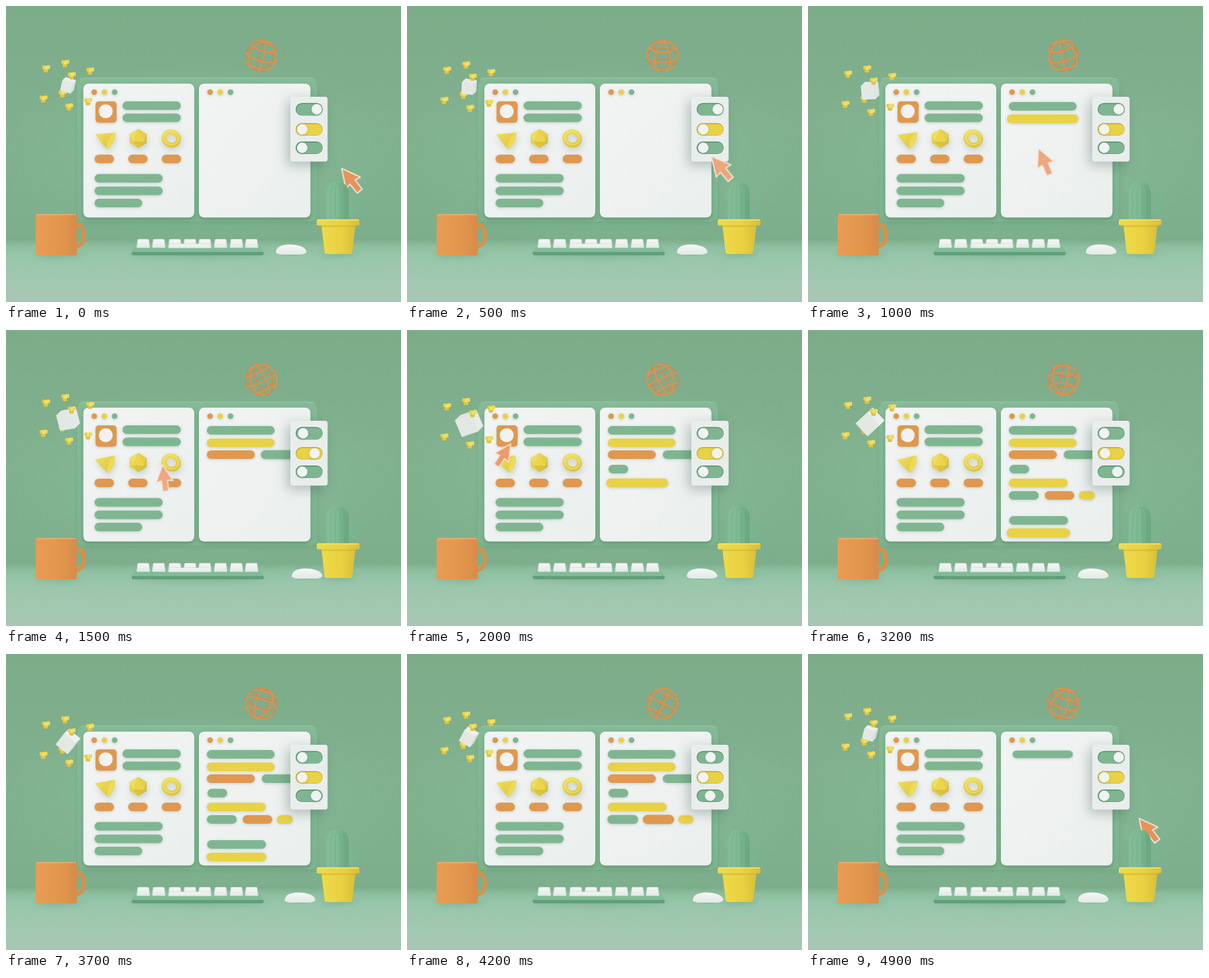
Write an HTML page that moves like this. It is 600 px wide and 450 px high and loops after 5 s.

```html
<!DOCTYPE html>
<html lang="en">
<head>
<meta charset="utf-8">
<title>Desk scene</title>
<style>
  html, body { margin: 0; width: 100%; height: 100%; overflow: hidden; background: #7fae8c; }
  svg { display: block; width: 100vw; height: 100vh; }

  .green { fill: #7fb691; }
  .yellow { fill: #e9d246; }
  .orange { fill: #e0984f; }
  .white { fill: #f0f3f2; }
  .soft { filter: drop-shadow(0 1.5px 2px rgba(50, 90, 65, .24)); }
  .float { filter: drop-shadow(1px 4px 5px rgba(60, 90, 75, .22)); }
  .lift { filter: drop-shadow(0 3px 3px rgba(40, 85, 58, .3)); }
  .raised { filter: drop-shadow(-5px 6px 9px rgba(50, 85, 68, .32)); }

  #knob1, #knob2, #knob3, #mouse, #cursor, #cone { animation: 5s linear infinite; }
  #knob1 { animation-name: knob1; }
  #knob2 { animation-name: knob2; }
  #knob3 { animation-name: knob3; }
  #mouse { animation-name: mouse; }
  #cursor { animation-name: cursor; }
  #cone { animation-name: cone; transform-origin: 152px 203px; }

  @keyframes knob1 {
    0%, 20% { transform: translateX(22px); animation-timing-function: ease-in-out; }
    32%, 78% { transform: none; animation-timing-function: ease-in-out; }
    90%, 100% { transform: translateX(22px); }
  }
  @keyframes knob2 {
    0%, 20% { transform: none; animation-timing-function: ease-in-out; }
    33%, 54% { transform: translateX(21px); animation-timing-function: ease-in-out; }
    66%, 100% { transform: none; }
  }
  @keyframes knob3 {
    0%, 54% { transform: none; animation-timing-function: ease-in-out; }
    66%, 78% { transform: translateX(21px); animation-timing-function: ease-in-out; }
    90%, 100% { transform: none; }
  }
  @keyframes mouse {
    0%, 12% { transform: none; animation-timing-function: ease-in-out; }
    28%, 34% { transform: translateX(24px); animation-timing-function: ease-in-out; }
    48%, 65% { transform: none; animation-timing-function: ease-in-out; }
    82%, 85% { transform: translateX(24px); animation-timing-function: ease-in-out; }
    97%, 100% { transform: none; }
  }
  @keyframes cursor {
    0% { transform: translate(510px, 247px) rotate(-38.5deg) scale(1); fill: #e6935a; visibility: visible; }
    10% { transform: translate(462.5px, 228.5px) rotate(-40deg) scale(1.04); fill: #eba679; }
    30% { transform: translate(238px, 205px) rotate(-7deg) scale(.92); fill: #f1a780; }
    50% { transform: translate(77.5px, 141px) rotate(73deg) scale(.88); fill: #e98f55; animation-timing-function: ease-in; }
    61% { transform: translate(101px, 342px) rotate(73deg) scale(.85); fill: #e98f55; visibility: visible; }
    61.1%, 87.9% { transform: translate(496px, 328px) rotate(-30deg) scale(.9); visibility: hidden; }
    88% { transform: translate(496px, 328px) rotate(-30deg) scale(.9); fill: #e98f55; visibility: visible; animation-timing-function: ease-out; }
    98% { transform: translate(503px, 250px) rotate(-38.5deg) scale(1); fill: #e6935a; }
    100% { transform: translate(510px, 247px) rotate(-38.5deg) scale(1); fill: #e6935a; visibility: visible; }
  }
  @keyframes cone {
    0%, 100% { transform: none; animation-timing-function: ease-in-out; }
    50% { transform: rotate(-10deg); animation-timing-function: ease-in-out; }
  }
</style>
</head>
<body>
<svg viewBox="0 0 600 450" preserveAspectRatio="none">
  <defs>
    <linearGradient id="room" x2="0" y2="1">
      <stop offset="0" stop-color="#7dac89"/>
      <stop offset=".4" stop-color="#80b08e"/>
      <stop offset=".7" stop-color="#7eb08e"/>
      <stop offset=".79" stop-color="#7dae8c"/>
      <stop offset=".812" stop-color="#8dbf9f"/>
      <stop offset=".85" stop-color="#99c6ab"/>
      <stop offset=".92" stop-color="#a2c8b0"/>
      <stop offset="1" stop-color="#a8c6b5"/>
    </linearGradient>
    <radialGradient id="glow">
      <stop offset="0" stop-color="#8fc4a2" stop-opacity=".5"/>
      <stop offset="1" stop-color="#8fc4a2" stop-opacity="0"/>
    </radialGradient>
    <linearGradient id="frame" x2="0" y2="1">
      <stop offset="0" stop-color="#86ba97"/>
      <stop offset="1" stop-color="#7eb48f"/>
    </linearGradient>
    <linearGradient id="paper" x2="1" y2="1">
      <stop offset="0" stop-color="#f1f4f3"/>
      <stop offset="1" stop-color="#ebefee"/>
    </linearGradient>
    <linearGradient id="clay">
      <stop offset="0" stop-color="#e79c53"/>
      <stop offset=".5" stop-color="#e3984f"/>
      <stop offset="1" stop-color="#d98b48"/>
    </linearGradient>
    <linearGradient id="pot">
      <stop offset="0" stop-color="#efda48"/>
      <stop offset=".6" stop-color="#e9d142"/>
      <stop offset="1" stop-color="#d9bf38"/>
    </linearGradient>
    <linearGradient id="plant">
      <stop offset="0" stop-color="#83bd97"/>
      <stop offset=".45" stop-color="#80bb95"/>
      <stop offset="1" stop-color="#68a680"/>
    </linearGradient>
    <linearGradient id="lemon" x2="1" y2="1">
      <stop offset="0" stop-color="#f0df5c"/>
      <stop offset="1" stop-color="#dcc13a"/>
    </linearGradient>
    <linearGradient id="cap" x2="0" y2="1">
      <stop offset="0" stop-color="#f5f7f6"/>
      <stop offset="1" stop-color="#e2e9e5"/>
    </linearGradient>
    <filter id="blur" x="-50%" y="-200%" width="200%" height="500%"><feGaussianBlur stdDeviation="4"/></filter>
    <g id="puff">
      <rect x="-6" y="-4.5" width="6.5" height="5.5" rx="1.6" fill="#e6cf4c"/>
      <rect x="0" y="-5" width="6" height="6" rx="1.6" fill="#eedb58"/>
      <rect x="-4" y="-1" width="7" height="7" rx="1.8" fill="#dfc43f"/>
      <rect x="-2.5" y="-3.5" width="5" height="5.5" rx="1.6" fill="#f0e06a"/>
    </g>
  </defs>

  <rect width="600" height="450" fill="url(#room)"/>
  <ellipse cx="300" cy="225" rx="330" ry="140" fill="url(#glow)"/>
  <g filter="url(#blur)" fill="#4f8a68">
    <rect x="112" y="120" width="362" height="212" rx="12" opacity=".2"/>
    <ellipse cx="80" cy="379" rx="36" ry="3" opacity=".35"/>
    <ellipse cx="292" cy="379" rx="102" ry="3" opacity=".35"/>
    <ellipse cx="505" cy="377" rx="26" ry="3" opacity=".35"/>
  </g>

  <!-- monitor -->
  <rect x="107" y="108.5" width="366.5" height="220.5" rx="12" fill="url(#frame)"/>
  <rect x="107.5" y="109" width="365.5" height="219.5" rx="11.5" fill="none" stroke="#6ca27e" stroke-opacity=".5"/>
  <path d="M112 112Q115 109.3 120 109.3H461Q466 109.3 469 112" fill="none" stroke="#93c4a3" stroke-width="1.2"/>
  <g class="lift" fill="url(#paper)">
    <rect x="117.5" y="118" width="168.5" height="203.5" rx="8"/>
    <rect x="293" y="118" width="169.5" height="203.5" rx="8"/>
  </g>
  <g id="page" class="soft">
    <rect class="orange" x="136" y="145" width="32" height="32.5" rx="5"/>
    <circle class="white" cx="151.5" cy="160" r="10.6"/>
  </g>

  <g class="float">
    <g id="cone">
      <path d="M136 195L166 192.500Q168 205 153.500 217.500Q144 208 136 195Z" fill="url(#lemon)"/>
      <ellipse cx="159.5" cy="205" rx="13.6" ry="4" transform="rotate(117 159.5 205)" fill="#eddb58"/>
    </g>
    <path d="M201 187L213.5 194.5V208.5L201 216L188 208.5V194.5Z" fill="#e6d04c"/>
    <path d="M201 187L188 194.5L192 206Z" fill="#efdd62"/>
    <path d="M201 187L213.5 194.5L210 206Z" fill="#e5ce4a"/>
    <path d="M201 187L192 206H210Z" fill="#ebd54c"/>
    <path d="M192 206H210L201 216Z" fill="#dcc340"/>
    <path d="M210 206L213.5 194.5V208.5L201 216Z" fill="#d7bc3b"/>
    <g transform="rotate(20 251 201.5)" fill="none">
      <ellipse cx="251" cy="201.5" rx="11.2" ry="10" stroke="url(#lemon)" stroke-width="7.6"/>
      <ellipse cx="250.6" cy="200.8" rx="11.2" ry="10" stroke="#f4e882" stroke-opacity=".5" stroke-width="2.4"/>
    </g>
  </g>

  <g id="code" class="soft"></g>

  <!-- switch panel -->
  <rect class="raised" x="432" y="138" width="56.5" height="98.5" rx="4" fill="#e9eeec"/>
  <g id="switches"></g>

  <g id="globe" fill="none" stroke-linecap="round">
    <path id="back" stroke="#cf8750" stroke-width="1.6"/>
    <path id="front" stroke="#e1914f" stroke-width="2.1"/>
  </g>

  <g id="cursor" stroke="#efe6dc" stroke-width="1.8" stroke-linejoin="round">
    <path d="M0 0L14 28L5 26.5L4.8 44H-4.8L-5 26.5L-14 28Z"/>
  </g>

  <g id="floaters">
    <g id="puffs"></g>
    <g id="cube" stroke-linejoin="round" stroke-width=".8"></g>
    <use href="#puff" x="100" y="105.5"/>
  </g>

  <!-- mug -->
  <path d="M104 332.500H107Q118.500 333 118.500 349T104 366" fill="none" stroke="#dc8f49" stroke-width="5.5"/>
  <rect x="45" y="316.5" width="62.5" height="62.5" rx="3.5" fill="url(#clay)"/>
  <rect x="46" y="316.5" width="60.5" height="1.6" rx=".8" fill="#edb074"/>

  <!-- keyboard -->
  <path d="M196 365.500H387L391.5 374H191Z" fill="#82bb97"/>
  <path d="M191 374H391.5V377Q391.5 379 389 379H193.5Q191 379 191 377Z" fill="#5f9f79"/>
  <g id="keys" fill="url(#cap)" stroke="#c5d6cc" stroke-width=".6"></g>

  <g id="mouse">
    <ellipse cx="433" cy="376.5" rx="22" ry="2.5" fill="#5f9878" opacity=".45"/>
    <path d="M410 374Q411 363 430 362.5Q453 363 456.5 373Q457 378 445 378H421Q410 378 410 374Z" fill="url(#cap)"/>
  </g>

  <!-- cactus -->
  <path d="M514 316Q532 314 534 294" fill="none" stroke="#7ab58f" stroke-width="9" stroke-linecap="round"/>
  <path d="M487 326V285Q487 267.500 503.5 267.500T520.500 285V326Z" fill="url(#plant)"/>
  <path d="M493 326V285Q494 275 500 270M500 326V284Q500 275 502.5 269M508 326V284Q508 275 505 269M515 326V285Q514 275 508 270" fill="none" stroke="#5f9b77" stroke-opacity=".4"/>
  <path d="M479 332H531L526 375Q525.7 377 523 377H487Q484.3 377 484 375Z" fill="url(#pot)"/>
  <path d="M478.5 333H531L530.5 336H479.5Z" fill="#c9ad35" opacity=".5"/>
  <rect x="472" y="324.5" width="65" height="9" rx="1.8" fill="url(#pot)"/>
  <rect x="473" y="324.5" width="63" height="1.6" rx=".8" fill="#f4e673"/>
</svg>

<script>
  const LOOP = 5, TAU = Math.PI * 2;
  const $ = id => document.getElementById(id);

  function add(parent, tag, attrs) {
    const el = document.createElementNS('http://www.w3.org/2000/svg', tag);
    for (const k in attrs) el.setAttribute(k, attrs[k]);
    return $(parent).appendChild(el);
  }

  const pill = (parent, x, y, width, color, height = 13) =>
    add(parent, 'rect', { x, y: y - height / 2, width, height, rx: height / 2, class: color });

  // window dots
  for (const x of [134, 310])
    ['orange', 'yellow', 'green'].forEach((c, i) =>
      add('page', 'circle', { cx: x + i * 15.5, cy: 131, r: 4.3, class: c }));

  // left page
  pill('page', 177, 151.5, 88.5, 'green');
  pill('page', 177, 170, 88.5, 'green');
  for (const x of [134.5, 185.5, 236.5]) pill('page', x, 232.5, 29.5, 'orange');
  pill('page', 134.5, 262, 103.5, 'green');
  pill('page', 134.5, 281, 103.5, 'green');
  pill('page', 134.5, 299.5, 72.5, 'green');

  // right page, in order of appearance
  const bars = [
    [305, 152.5, 103, 'green'], [305, 171.5, 103, 'yellow'],
    [305, 189.5, 73, 'orange'], [388.5, 189.5, 56, 'green'],
    [306, 211.5, 30, 'green'], [305, 232.5, 89.5, 'yellow'],
    [305, 251.5, 45.5, 'green'], [359.5, 251.5, 45, 'orange'], [411.5, 251.5, 24, 'yellow'],
    [305.5, 289.5, 89.5, 'green'], [304.5, 308.5, 91, 'yellow']
  ].map(([x, y, w, c]) => ({ el: pill('code', x, y, w, c), cx: x + w / 2, cy: y }));

  // switches: dark recess, then track, then knob
  [['green', 157], ['yellow', 187.5], ['green', 215.5]].forEach(([color, y], i) => {
    add('switches', 'rect', { x: 440, y: y - 9.5, width: 41, height: 19, rx: 9.5, fill: i === 1 ? '#c4a634' : '#56916c' });
    pill('switches', 441.2, y + .5, 39.3, color, 17);
    add('switches', 'circle', { id: 'knob' + (i + 1), cx: 450, cy: y, r: 7.9, class: 'white soft' });
  });

  // keys
  const key = (x, y, w, h) =>
    add('keys', 'path', { d: `M${x + 3} ${y}h${w - 6}q1 0 1.5 1l1.5 ${h - 1}h${-w}l1.5 ${1 - h}q.5-1 1.5-1Z` });
  for (const x of [198.5, 222, 246.5, 269.5, 292, 316, 340, 363]) key(x, 354.5, 20, 13);
  key(246.5, 361.5, 65, 6.5);

  for (const [x, y] of [[61, 95], [90, 87], [128, 98.5], [57, 141], [86, 133], [96, 153], [125, 145]])
    add('puffs', 'use', { href: '#puff', x, y });

  const turn = (a, b, k) => [a * Math.cos(k) - b * Math.sin(k), a * Math.sin(k) + b * Math.cos(k)];

  function barScale(i, t) {
    const into = (t - (.5 + i * .25)) / .4;
    const out = (t - (4.675 - i * .086)) / .3;
    if (into <= 0 || out >= 1) return 0;
    if (out > 0) return out < .45
      ? 1 + .06 * Math.sin(out / .45 * Math.PI / 2)
      : 1.06 * (1 - ((out - .45) / .55) ** 3);
    if (into >= 1) return 1;
    return into < .5
      ? 1.06 * Math.sin(into * Math.PI)
      : 1 + .03 * (1 + Math.cos((into - .5) * TAU));
  }

  function drawBars(t) {
    bars.forEach(({ el, cx, cy }, i) => {
      const s = barScale(i, t);
      el.setAttribute('transform', `translate(${cx} ${cy}) scale(${s}) translate(${-cx} ${-cy})`);
    });
  }

  // wire rings: three meridians and three parallels
  function ringPoint(ring, a) {
    if (ring < 3) {
      const m = ring * Math.PI / 3;
      return [Math.cos(a) * Math.cos(m), Math.sin(a), Math.cos(a) * Math.sin(m)];
    }
    const lat = (ring - 4) * .65;
    return [Math.cos(a) * Math.cos(lat), Math.sin(lat), Math.sin(a) * Math.cos(lat)];
  }

  function drawGlobe(t) {
    const R = 24, N = 40, paths = ['', ''];
    const place = p => {
      let [x, y, z] = p;
      [y, z] = turn(y, z, .45);
      [x, z] = turn(x, z, TAU * t / LOOP + 2.5);
      return [388 + x * R, 75.8 + y * R, z];
    };
    for (let ring = 0; ring < 6; ring++) {
      let p = place(ringPoint(ring, 0));
      for (let i = 1; i <= N; i++) {
        const q = place(ringPoint(ring, i / N * TAU));
        paths[p[2] + q[2] > 0 ? 1 : 0] += `M${p[0].toFixed(2)} ${p[1].toFixed(2)}L${q[0].toFixed(2)} ${q[1].toFixed(2)}`;
        p = q;
      }
    }
    $('back').setAttribute('d', paths[0]);
    $('front').setAttribute('d', paths[1]);
  }

  const faces = Array.from({ length: 6 }, () => add('cube', 'polygon', {}));

  function drawCube(t) {
    const swing = Math.cos(TAU * t / LOOP);
    const half = 11.2 - 3 * swing;
    const spin = .31 - Math.PI / 2 * t / LOOP;
    const place = p => {
      let [x, y, z] = p;
      [x, y] = turn(x, y, spin);
      [y, z] = turn(y, z, -.3);
      [x, z] = turn(x, z, .32);
      return [x, y, z];
    };
    faces.forEach((el, f) => {
      const axis = f >> 1, sign = f & 1 ? 1 : -1;
      const at = (u, v) => {
        const p = [0, 0, 0];
        p[axis] = sign;
        p[(axis + 1) % 3] = u;
        p[(axis + 2) % 3] = v;
        return place(p);
      };
      const n = at(0, 0);
      if (n[2] <= 0) return el.setAttribute('points', '');
      const light = Math.max(0, n[0] * .25 - n[1] * .45 + n[2] * .85);
      const color = `hsl(150 9% ${(82 + 14 * Math.min(1, light)).toFixed(1)}%)`;
      el.setAttribute('points', [[-1, -1], [1, -1], [1, 1], [-1, 1]].map(([u, v]) => {
        const [x, y] = at(u, v);
        return `${(94.3 + x * half).toFixed(2)},${(120.5 + y * half).toFixed(2)}`;
      }).join(' '));
      el.setAttribute('fill', color);
      el.setAttribute('stroke', color);
    });
    $('floaters').setAttribute('transform', `translate(0 ${11.8 * (1 - swing)})`);
  }

  let start;
  function tick(now) {
    start ??= now;
    const t = (now - start) / 1000 % LOOP;
    drawBars(t);
    drawGlobe(t);
    drawCube(t);
    requestAnimationFrame(tick);
  }
  requestAnimationFrame(tick);
</script>
</body>
</html>
```
